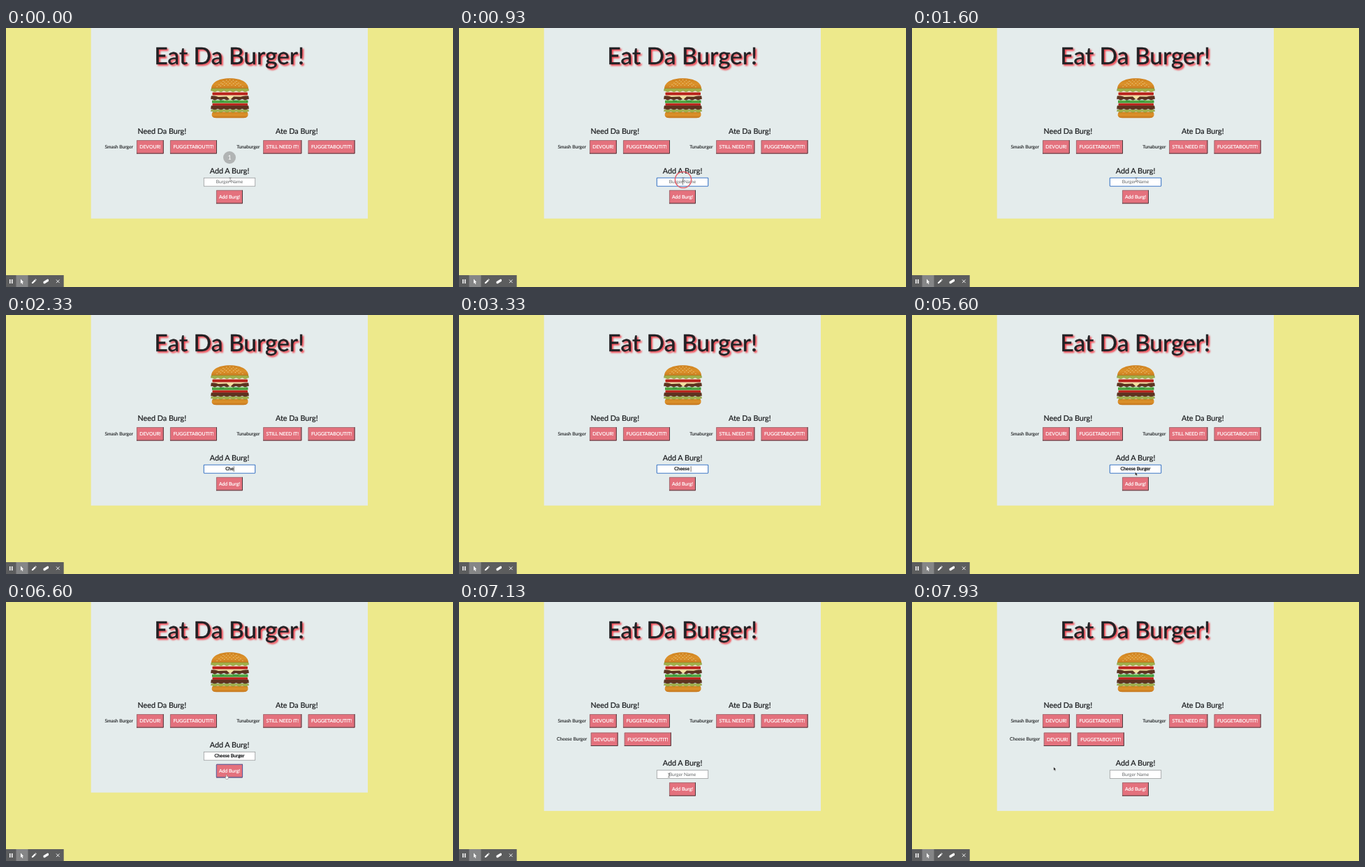
Animation of 640 by 372 pixels, one loop 8 s. Source, as an HTML page:

```html
<!DOCTYPE html>
<html lang="en">
<head>
<meta charset="utf-8">
<title>Eat Da Burger!</title>
<style>
  html, body { margin: 0; width: 100%; height: 100%; overflow: hidden; background: #ede98b; }
  svg { display: block; width: 640px; height: 372px; }
  text { font: 6.7px Lato, "Open Sans", sans-serif; fill: #1c1e20; text-rendering: geometricPrecision; white-space: pre; }
  .title { font-size: 33.6px; fill: #212124; stroke: #212124; stroke-width: .5px; filter: drop-shadow(2px 2px 1.3px #f2414c); }
  .head { font-size: 10.8px; stroke: #1c1e20; stroke-width: .22px; }
  .item { stroke: #1c1e20; stroke-width: .12px; }
  .typed { stroke: #1c1e20; stroke-width: .3px; }
  .label { font-size: 6.9px; fill: #fff; stroke: #fff; stroke-width: .2px; }
  .mid { text-anchor: middle; }
</style>
</head>
<body>
<svg viewBox="0 0 640 372">
  <defs>
    <linearGradient id="bun" x1="0" y1="0" x2="0" y2="1">
      <stop offset="0" stop-color="#cf821f"/>
      <stop offset=".5" stop-color="#dc922b"/>
      <stop offset="1" stop-color="#c4751d"/>
    </linearGradient>
  </defs>
  <rect id="panel" x="121.700" width="396.300" height="273.700" fill="#e4ecec"/>
  <text class="title mid" x="319.700" y="52">Eat Da Burger!</text>

  <g id="burger">
    <path d="M294 89C293 79 303 72.300 320.500 72.300S348 79 347 89Z" fill="url(#bun)"/>
    <g id="seeds" fill="#f3dca0"></g>
    <rect x="295" y="90" width="51" height="8" fill="#efe6cc"/>
    <rect x="295.500" y="92.600" width="50.500" height="3.800" rx="1" fill="#b9211a"/>
    <path class="wavy" data-y="87" data-h="3.800" fill="#a3b14a" stroke="#748c33"/>
    <path class="wavy" data-y="97.800" data-h="4.900" fill="#5e3320" stroke="#4a2617"/>
    <path d="M298 97H343L336 98.800L326 98.600L321 103L316 98.600L304 99Z" fill="#f3dfa0"/>
    <rect x="295" y="103.700" width="51.500" height="4.200" rx="1" fill="#3f9c3d"/>
    <path d="M296 104.700H306M312 104.700H325M333 104.700H344" stroke="#86c656"/>
    <rect x="295.500" y="107.900" width="50.500" height="3.800" rx="1" fill="#b9211a"/>
    <path d="M296 108H346" stroke="#e6cfa4" stroke-width=".6"/>
    <path class="wavy" data-y="111.800" data-h="5" fill="#5e3320" stroke="#4a2617"/>
    <path d="M296 120.500H345.500C348 125.500 346 129.300 340 129.300H301C295 129.300 293 125.500 296 120.500Z" fill="url(#bun)"/>
    <path class="wavy" data-y="117.400" data-h="3" fill="#a3b14a" stroke="#748c33"/>
  </g>

  <text class="head mid" x="223.300" y="152">Need Da Burg!</text>
  <text class="head mid" x="416.300" y="152">Ate Da Burg!</text>
  <g id="rows"></g>
  <g id="fresh"></g>

  <g id="form">
    <text class="head mid" x="320" y="209">Add A Burg!</text>
    <rect id="field" x="283.300" y="215.300" width="73.400" height="11.900" fill="#fff"/>
    <text id="entry" x="320" y="223.400"></text>
    <path id="caret" stroke="#333" stroke-width=".7"/>
    <g id="add"></g>
    <rect id="addFocus" x="301.300" y="233.300" width="37.300" height="18.600" rx=".8" fill="#e4717d" fill-opacity=".3" stroke="#5a63a6"/>
    <text class="label mid" x="320" y="245.100">Add Burg!</text>
  </g>

  <g id="count">
    <circle cx="320" cy="186" r="9" fill="#b1b4b4"/>
    <text class="mid" x="320" y="189.200" style="font-size:9px;fill:#fff">1</text>
  </g>
  <circle id="ring" fill="none" stroke="#e2606b" stroke-width="1.500"/>

  <g id="mouse">
    <path id="beam" d="M-1.500-3Q0-3 0-2Q0-3 1.500-3M0-2V2M-1.500 3Q0 3 0 2Q0 3 1.500 3" fill="none" stroke="#555" stroke-width=".6"/>
    <path id="arrow" d="M0-2V3L1.200 1.900L2 3.800L2.900 3.400L2.100 1.600H3.600Z" fill="#111" stroke="#fff" stroke-width=".4"/>
    <path id="hand" d="M-1-2.200Q-.400-3 .200-2.200V-.300L2.300.300V2.200L1.600 4H-.800L-2.400 1.300L-1.900.700L-1 1.300Z" fill="#fff" stroke="#555" stroke-width=".4"/>
  </g>

  <g id="toolbar">
    <rect y="355" width="82.700" height="17" fill="#5c5d5e"/>
    <rect x="14.500" y="355" width="17" height="17" fill="#858687"/>
    <g fill="#fff">
      <path d="M5 361h1.500v6H5zM8 361h1.500v6H8z"/>
      <path d="M21 360.500V367L22.400 365.700L23.400 368L24.400 367.500L23.400 365.300H25.200Z"/>
      <path d="M36.800 367.300L37.300 365.200L41.200 361.300L42.800 362.900L38.900 366.800Z"/>
      <path d="M41.700 360.800L42.300 360.300L43.800 361.800L43.300 362.400Z"/>
      <path d="M53.500 364.200L59.700 360.600L61 361.300V363.800L55 367.400L53.500 366.600Z"/>
    </g>
    <path d="M72 361.500l4.600 4.600m0-4.600l-4.600 4.600" stroke="#fff" stroke-width=".9"/>
  </g>
</svg>
<script>
const $ = id => document.getElementById(id);
const set = (el, attrs) => { for (const k in attrs) el.setAttribute(k, attrs[k]); };
const show = (el, on) => { el.style.display = on ? '' : 'none'; };
const clamp = v => Math.max(0, Math.min(1, v));
const ease = v => v * v * (3 - 2 * v);

const LOOP = 8000, SHIFT = 26.4, RELOAD = 6900;
const WORD = 'Cheese Burger';
const KEYS = [1700, 1950, 2250, 2500, 2750, 2950, 3200, 3600, 3880, 4130, 4400, 4680, 4920];
const CLICKS = [820, 6270];

function button(x, y, w, label = '') {
  const r = x + w, b = y + 19.4;
  return `<rect x="${x}" y="${y}" width="${w}" height="19.4" fill="#e4717d"/>
    <path d="M${x + .4} ${b}V${y + .4}H${r}" fill="none" stroke="#946a70" stroke-width=".8"/>
    <path d="M${x} ${b - .5}H${r - .5}V${y}" fill="none" stroke="#4a3a3e"/>
    <text class="label mid" x="${x + w / 2}" y="${y + 12.1}">${label}</text>`;
}

function row(x, y, name, x1, w1, action) {
  return `<text class="item" x="${x}" y="${y + 11.8}">${name}</text>`
    + button(x1, y, w1, action) + button(x1 + w1 + 9.2, y, 67, 'FUGGETABOUTIT!');
}

$('rows').innerHTML = row(141.5, 161.2, 'Smash Burger', 187, 38.8, 'DEVOUR!')
  + row(330.3, 161.2, 'Tunaburger', 368.2, 55.2, 'STILL NEED IT!');
$('fresh').innerHTML = row(140, 187.6, WORD, 188.8, 38.8, 'DEVOUR!');
$('add').innerHTML = button(301, 232.9, 38);

// Sesame seeds in arched rows
let seeds = '';
for (let r = 0; r < 4; r++) {
  const n = 5 + r;
  for (let i = 0; i < n; i++) {
    const u = (i + .5) / n * 2 - 1;
    seeds += `<ellipse cx="${320.5 + u * (12 + r * 3)}" cy="${74.5 + r * 2.5 + u * u * 3}" rx=".7" ry=".5"/>`;
  }
}
$('seeds').innerHTML = seeds;

for (const layer of document.querySelectorAll('.wavy')) {
  const y = +layer.dataset.y, low = y + +layer.dataset.h;
  let d = `M294 ${y}H347`;
  for (let x = 347.5; x >= 293.5; x--) d += `L${x} ${low + Math.sin(x * .72) * .8}`;
  set(layer, { d: d + 'Z', 'stroke-width': .5 });
}

function pointer(t) {
  const a = ease(clamp((t - 5350) / 700)), b = ease(clamp((t - 6980) / 650));
  const x = 321 - 5 * a, y = 218 + 32.5 * a;
  return [x + (202.8 - x) * b, y + (239 - y) * b];
}

function draw(t) {
  const done = t >= RELOAD, dy = done ? SHIFT : 0;
  set($('panel'), { height: 273.7 + dy });
  set($('form'), { transform: `translate(0 ${dy})` });
  show($('fresh'), done);

  const typed = done ? 0 : KEYS.filter(k => t >= k).length;
  const focus = t >= CLICKS[0] && t < CLICKS[1];
  const entry = $('entry');
  const text = typed ? WORD.slice(0, typed).replace(/ /g, '\u00a0') : 'Burger Name';
  if (entry.textContent !== text) entry.textContent = text;
  entry.setAttribute('class', typed ? 'mid typed' : 'mid');
  entry.style.fill = typed ? '' : '#66696b';
  set($('field'), {
    stroke: focus ? '#3f78c6' : '#999c9d',
    'stroke-width': focus ? 1.1 : .8,
    rx: focus ? .6 : 0
  });

  const last = typed ? KEYS[typed - 1] : CLICKS[0];
  show($('caret'), focus && (t - last) % 1000 < 500);
  const end = 320.4 + (typed ? entry.getComputedTextLength() / 2 : 0);
  set($('caret'), { d: `M${end} 217.2V225.2` });
  show($('addFocus'), t >= CLICKS[1] && !done);

  $('count').style.opacity = 1 - clamp((t - 60) / 250);

  const [x, y] = pointer(t);
  const since = t - CLICKS[t >= CLICKS[1] ? 1 : 0];
  show($('ring'), since >= 0 && since < 310);
  set($('ring'), { cx: x, cy: y, r: 4 + 7.6 * clamp(since / 100), opacity: 1 - clamp((since - 200) / 110) });

  const inside = (l, r, top, bottom) => x > l && x < r && y - dy > top && y - dy < bottom;
  const overField = inside(283, 357, 214.5, 227.5), overAdd = inside(301, 339, 233, 252.5);
  set($('mouse'), { transform: `translate(${x} ${y})` });
  show($('mouse'), t < KEYS[0] || t > 5300);
  show($('beam'), overField);
  show($('hand'), overAdd);
  show($('arrow'), !overField && !overAdd);
}

function tick() {
  draw(performance.now() % LOOP);
  requestAnimationFrame(tick);
}
tick();
</script>
</body>
</html>
```
